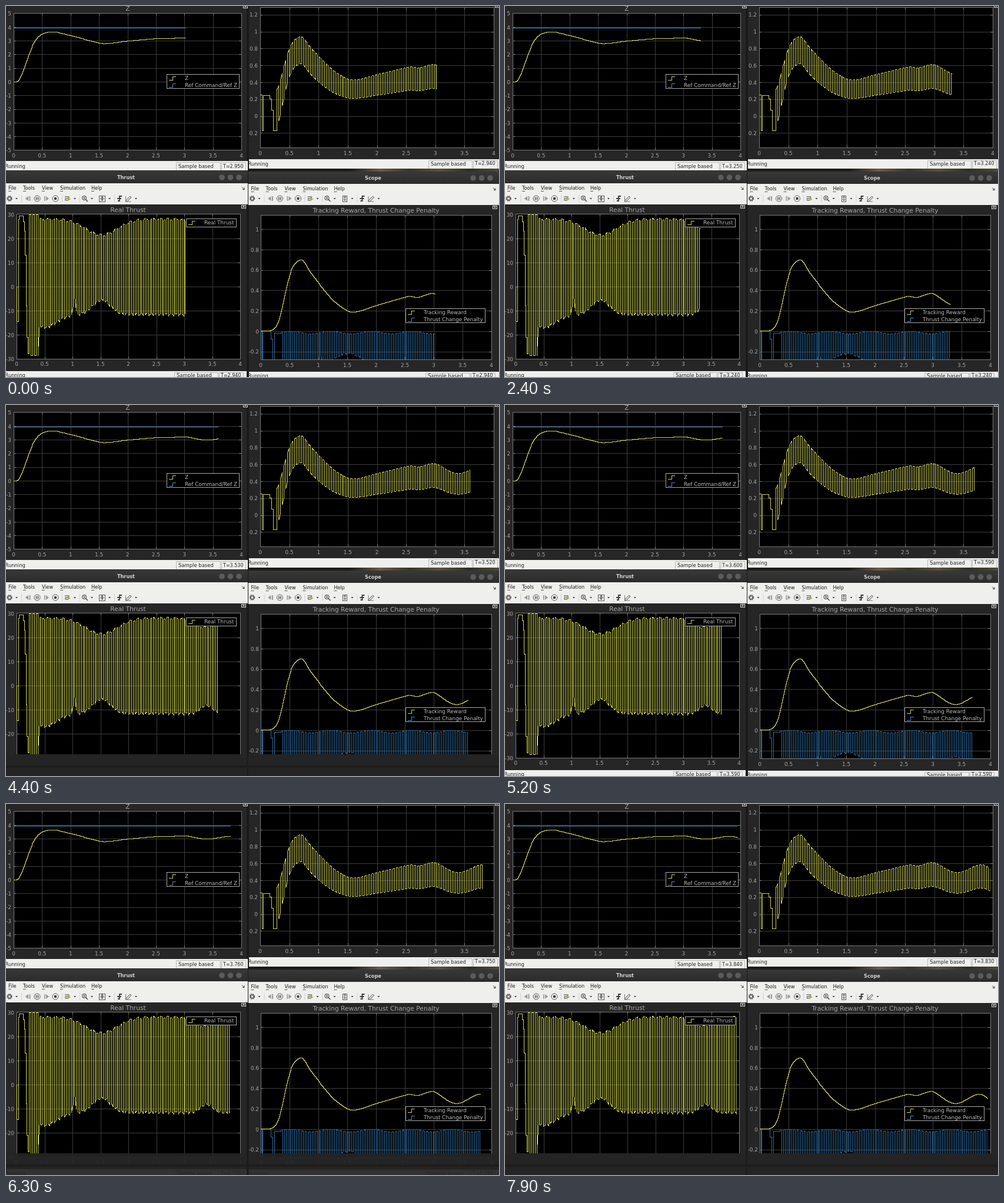
Write an HTML page that moves like this. It is 838 px wide and 632 px high and loops after 8000 ms.

```html
<!DOCTYPE html>
<html lang="en">
<head>
<meta charset="utf-8">
<title>Scopes</title>
<style>
  html, body { margin: 0; width: 100%; height: 100%; overflow: hidden; background: #222; }
  svg { display: block; width: 838px; height: 632px; }
  text { font-family: "DejaVu Sans", sans-serif; white-space: pre; }
  .crisp { shape-rendering: crispEdges; }
</style>
</head>
<body>
<svg id="stage" viewBox="0 0 838 632" xmlns="http://www.w3.org/2000/svg">
  <defs>
    <linearGradient id="bar" x1="0" y1="0" x2="0" y2="1">
      <stop offset="0" stop-color="#383838"/><stop offset="1" stop-color="#2b2b2b"/>
    </linearGradient>
    <linearGradient id="desk">
      <stop offset="0" stop-color="#1d1c18"/><stop offset=".2" stop-color="#6a5c46"/>
      <stop offset=".4" stop-color="#37352a"/><stop offset=".6" stop-color="#5a5040"/>
      <stop offset=".8" stop-color="#2c3024"/><stop offset="1" stop-color="#514839"/>
    </linearGradient>
  </defs>
</svg>
<script>
const stage = document.getElementById('stage');
const defs = stage.querySelector('defs');
const YELLOW = '#cdd052', BLUE = '#3d8fc9', DEEP_BLUE = '#2d6da3', LABEL = '#a6a6a6', INK = '#222';
const crisp = { class: 'crisp' };

function el(name, attrs, parent = stage) {
  const node = document.createElementNS('http://www.w3.org/2000/svg', name);
  for (const key in attrs) node.setAttribute(key, attrs[key]);
  parent.appendChild(node);
  return node;
}
const rect = (x, y, width, height, fill, more = {}, parent) =>
  el('rect', { x, y, width, height, fill, ...more }, parent);
const path = (d, stroke, width = 1, more = {}, parent) =>
  el('path', { d, fill: 'none', stroke, 'stroke-width': width, ...more }, parent);
const shape = (d, fill) => el('path', { d, fill });
const circle = (cx, cy, r, fill, more = {}) => el('circle', { cx, cy, r, fill, ...more });
const frameBox = (x, y, w, h, fill, stroke) =>
  rect(x + .5, y + .5, w, h, fill, { stroke, ...crisp });

// Text whose capitals are centred on y.
function label(x, y, text, size = 8.9, fill = LABEL, anchor = 'start', more = {}) {
  const node = el('text', { x, y: y + size * 0.365, 'font-size': size, fill, 'text-anchor': anchor, ...more });
  node.textContent = text;
  return node;
}

// ---- signals -----------------------------------------------------------
const bump = (t, centre, width) => Math.exp(-(((t - centre) / width) ** 2));

// Interpolation through [x, y] keys: straight, or smooth with Hermite tangents.
function through(keys, x, smooth = false) {
  let i = 0;
  while (i < keys.length - 2 && x > keys[i + 1][0]) i++;
  const [x0, y0] = keys[i], [x1, y1] = keys[i + 1], h = x1 - x0;
  const k = Math.min(1, Math.max(0, (x - x0) / h));
  if (!smooth) return y0 + k * (y1 - y0);
  const slope = j => {
    const a = keys[j - 1], b = keys[j + 1];
    return a && b ? (b[1] - a[1]) / (b[0] - a[0]) : 0;
  };
  return (1 + 2 * k) * (1 - k) ** 2 * y0 + k * (1 - k) ** 2 * h * slope(i) +
    k * k * (3 - 2 * k) * y1 + k * k * (k - 1) * h * slope(i + 1);
}

const REF = 3.95;
const swings = [[.7, 3.65], [.85, 3.52], [1.08, 3.29], [1.33, 3], [1.58, 2.79], [2, 2.97],
  [2.55, 3.16], [2.72, 3.145], [3, 3.21], [3.38, 2.97], [3.81, 3.17], [4.1, 2.97]];
const height = t => t < .7
  ? 3.66 * (1 - Math.exp(-((Math.max(0, t - .05) / .245) ** 1.83)))
  : through(swings, t, true);
const reward = t => Math.exp(-1.415 * (REF - height(t)) ** 1.143);

const signalHi = t => reward(t) + .24;
const signalLo = t => {
  const r = reward(t);
  return .12 + .38 * r + .48 * r * r - .29 * bump(t, .25, .15);
};
const thrustHi = t => t < .39 ? 30
  : 28 - 6.6 * bump(t, 1.52, .4) - 3.8 * bump(t, 3.36, .25) + .5 * Math.sin(t * 47);
const thrustLo = t => t < .39 ? -28.7
  : -11.6 - 5.3 * bump(t, .5, .3) + 6 * bump(t, 1.52, .22) + 3.5 * bump(t, 3.4, .15) +
    8 * bump(t, 1.035, .025) + .6 * Math.sin(t * 71);
const penaltyHi = t => -.015 - .012 * Math.sin(t * 9);
const penaltyLo = t => -.0081 * (thrustHi(t) - thrustLo(t));

// ---- plots -------------------------------------------------------------
const clips = [];

function makePlot({ x0, x1, top, bottom, y0, unit, from, to, step, labelX, labelY }) {
  const X = t => x0 + (x1 - x0) * t / 4;
  const Y = v => y0 - unit * v;
  rect(x0, top, x1 - x0, bottom - top, '#000');
  let grid = '', ticks = '';
  for (let t = 0; t <= 4; t += .5) {
    const x = Math.round(X(t)) + .5;
    if (t > 0 && t < 4) {
      grid += `M${x} ${top}V${bottom}`;
      ticks += `M${x} ${top}v4M${x} ${bottom}v-4`;
    }
    label(X(t), labelY, String(t), 8.9, LABEL, 'middle');
  }
  for (let i = 0; i <= Math.round((to - from) / step); i++) {
    const v = +(from + i * step).toFixed(1), y = Math.round(Y(v)) + .5;
    if (y > top + 2 && y < bottom - 2) {
      grid += `M${x0} ${y}H${x1}`;
      ticks += `M${x0} ${y}h4M${x1} ${y}h-4`;
    }
    label(labelX, Y(v) + .5, String(v), 8.9, LABEL, 'end');
  }
  path(grid, '#3c3c3c', 1, crisp);
  path(ticks, '#808080', 1, crisp);
  frameBox(x0, top, x1 - x0, bottom - top, 'none', '#787878');

  const id = 'clip' + clips.length;
  const clip = el('clipPath', { id }, defs);
  clips.push({ node: rect(x0 - 1, top, 0, bottom - top, '#fff', {}, clip), X, x0 });
  const group = el('g', { 'clip-path': `url(#${id})`, ...crisp });
  return { X, Y, group };
}

// Sampled curve drawn as a fine staircase.
function stairs({ X, Y, group }, value, color) {
  let d = `M${X(0)} ${Y(value(0))}`;
  for (let t = .01; t <= 4; t += .01) d += `H${X(t).toFixed(1)}V${Y(value(t)).toFixed(1)}`;
  path(d, color, 1, {}, group);
}

// Opening steps [time, value], then a square wave between two envelopes.
function pulses({ X, Y, group }, opening, start, hi, lo, color) {
  const PERIOD = .06;
  let d = `M${X(0)} ${Y(opening[0][1])}`;
  const jump = (t, v) => d += `H${X(t).toFixed(1)}V${Y(v).toFixed(1)}`;
  const slide = (t, v) => d += `L${X(t).toFixed(1)} ${Y(v).toFixed(1)}`;
  for (const [t, v] of opening) jump(t, v);
  for (let t = start; t < 4; t += PERIOD) {
    const mid = t + PERIOD / 2, end = t + PERIOD;
    jump(t, hi(t));
    slide(mid, hi(mid));
    jump(mid, lo(mid));
    slide(end, lo(end));
  }
  path(d, color, 1, {}, group);
}

function legend(x, y, w, h, items) {
  frameBox(x, y, w, h, '#000', '#a8a8a8');
  items.forEach(([text, color], i) => {
    const cy = y + 7 + i * 12;
    path(`M${x + 4} ${cy + 3.5}h6v-6h6`, color, 1, crisp);
    label(x + 31, cy, text, 8.9, '#bcbcbc');
  });
}

// ---- window furniture --------------------------------------------------
function statusBar(x, y, w, h, textY, sampleX, timeX) {
  rect(x, y, w, h, '#efefed');
  label(x - 1.5, textY, 'Running', 8.4, INK);
  path(`M${sampleX - 3.5} ${y + h}V${y + 2.5}H${timeX - 4.5}V${y + h}M${timeX - 2.5} ${y + h}V${y + 2.5}h41V${y + h}`, '#b8b8b6');
  label(sampleX, textY, 'Sample based', 8.45, INK);
  return label(timeX, textY, '', 8, INK);
}

function dockIcon(x, y) {
  frameBox(x - 4, y - 3, 7, 5, '#222', '#d8d8d8');
  path(`M${x - 2} ${y}h4M${x} ${y - 2}v3`, '#d8d8d8');
}

function toolbar(x, y, fitW) {
  const grey = '#777', mid = '#555', dark = '#3a3a3a', pale = '#f4f4f4';
  circle(x + 6, y, 3.5, 'none', { stroke: mid, 'stroke-width': 2.4, 'stroke-dasharray': '2 .75' });
  circle(x + 6, y, 2.4, 'none', { stroke: mid });
  for (const c of [18, 117, 146, 176, 221]) shape(`M${x + c - 2} ${y - 1}h4l-2 2.5z`, dark);
  for (const c of [26, 95, 125, 184]) path(`M${x + c + .5} ${y - 6}v12`, '#d0d0d0');
  shape(`M${x + 38} ${y - 4}v8l-5.5-4zM${x + 39.5} ${y - 4}h2v8h-2z`, '#999');
  circle(x + 53, y, 5, pale, { stroke: mid });
  path(`M${x + 51.5} ${y - 2.5}v5m3 0v-5`, dark, 1.4);
  shape(`M${x + 65} ${y - 4}h1.6v8h-1.6zM${x + 68} ${y - 4}v8l5-4z`, '#999');
  circle(x + 84, y, 5, pale, { stroke: mid });
  rect(x + 82, y - 2, 4, 4, dark);
  path(`M${x + 100} ${y - 3}h7v3h-6v3h5`, grey, 1.3);
  shape(`M${x + 105} ${y - 2}l5 3-5 3z`, '#b9a545');
  circle(x + 133, y - 1, 3.4, pale, { stroke: mid, 'stroke-width': 1.2 });
  path(`M${x + 135.5} ${y + 1.5}l3.5 3.5M${x + 131.5} ${y - 1}h3m-1.5-1.5v3`, dark, 1.2);
  frameBox(x + 163 - fitW / 2, y - 5, fitW, 10, pale, mid);
  path(`M${x + 163.5} ${y - 3.5}v7M${x + 161.5} ${y - 1.5}l2-2 2 2m-4 3l2 2 2-2`, dark);
  if (fitW > 8) path(`M${x + 160} ${y}h7`, dark);
  path(`M${x + 190} ${y + 4}h3v-8h4M${x + 189} ${y}h7`, dark, 1.8);
  path(`M${x + 204} ${y + 3}l7-7 2 2-7 7h-3z`, mid, 1, { fill: '#ddd' });
  path(`M${x + 203.5} ${y - 4}v9h9`, grey);
}

function windowHead(x, w, y, left, title, titleX, dotX, fitW) {
  rect(x, y - 11, w, 21, 'url(#bar)');
  label(titleX, y, title, 8.2, '#d2d2d2', 'middle', { 'font-weight': 'bold' });
  for (let i = 0; i < 3; i++) circle(dotX + i * 14.5, y, 4.8, '#5b5b5b');
  rect(x, y + 10, w, 36, '#efefee');
  const menu = { File: 4, Tools: 29, View: 61, Simulation: 92, Help: 145 };
  for (const text in menu) {
    const mx = left + menu[text];
    label(mx, y + 18.5, text, 8.1, '#1c1c1c');
    path(`M${mx} ${y + 23.5}h5`, '#333', .8);
  }
  path(`M${x + w - 10} ${y + 16.5}l4 4m0-3v3h-3`, '#333');
  toolbar(left, 328, fitW);
}

// ---- scene -------------------------------------------------------------
rect(0, 0, 838, 632, '#262626');
rect(409, 0, 4, 632, '#1a1a1a');
rect(411, 277, 427, 6, '#1b1b19');
rect(585, 277, 253, 5, 'url(#desk)');

const zPlot = makePlot({ x0: 13, x1: 400, top: 12, bottom: 245, y0: 129, unit: 23.3,
  from: -5, to: 5, step: 1, labelX: 9, labelY: 254.5 });
label(207, 4, 'Z', 10.66, LABEL, 'middle');
stairs(zPlot, () => REF, BLUE);
stairs(zPlot, height, YELLOW);
legend(273, 116, 123, 24, [['Z', YELLOW], ['Ref Command/Ref Z', BLUE]]);
dockIcon(407, 1);
const times = [statusBar(0, 264, 411, 16, 273, 293, 369)];

const signalPlot = makePlot({ x0: 432, x1: 829, top: 2, bottom: 241, y0: 187.5, unit: 144,
  from: -.2, to: 1.2, step: .2, labelX: 428, labelY: 250.5 });
rect(409, 210, 4, 12, '#1a1a1a');
pulses(signalPlot, [[0, .25], [.03, -.17], [.05, .24], [.17, .2], [.2, .07], [.23, -.17]], .29,
  signalHi, signalLo, YELLOW);
dockIcon(835, 0);
times.push(statusBar(413, 261, 425, 16, 268.5, 722, 797));

const thrustPlot = makePlot({ x0: 18, x1: 398, top: 354, bottom: 601, y0: 478, unit: 4.1,
  from: -30, to: 30, step: 10, labelX: 14, labelY: 610 });
label(207.5, 347, 'Real Thrust', 10.66, LABEL, 'middle');
pulses(thrustPlot, [[0, 0], [.01, -14.5], [.035, 28], [.05, 29.5], [.12, 27], [.14, 23], [.155, 13],
  [.17, -8], [.185, -21], [.2, -28]], .23, thrustHi, thrustLo, '#d6dc4c');
legend(306, 362, 85, 14, [['Real Thrust', YELLOW]]);
dockIcon(404, 342);
windowHead(0, 411, 292, 0, 'Thrust', 204, 367, 10);
times.push(statusBar(0, 622, 409, 10, 629, 290, 365));

const rewardPlot = makePlot({ x0: 433, x1: 825, top: 356, bottom: 602, y0: 553.8, unit: 173.5,
  from: -.2, to: 1, step: .2, labelX: 430, labelY: 611.5 });
label(629, 348, 'Tracking Reward, Thrust Change Penalty', 10.66, LABEL, 'middle');
pulses(rewardPlot, [[0, 0], [.02, -.4], [.04, 0], [.18, -.08], [.21, -.4], [.24, -.02]], .35,
  penaltyHi, penaltyLo, DEEP_BLUE);
stairs(rewardPlot, reward, YELLOW);
legend(679, 515, 135, 24, [['Tracking Reward', YELLOW], ['Thrust Change Penalty', BLUE]]);
dockIcon(831, 343);
windowHead(412, 426, 293, 412.5, 'Scope', 624, 794, 7);
times.push(statusBar(413, 623, 425, 9, 629.5, 717, 793));

// dark band at the bottom
const band = el('g', { opacity: 0 });
rect(0, 595, 838, 37, '#232423', {}, band);
rect(0, 614, 838, 4, '#1c1d1c', {}, band);
rect(409, 595, 3, 37, '#1c1d1c', {}, band);

// ---- motion (seconds) --------------------------------------------------
const LOOP = 8000, TICK = 100;
const drawn = [[0, 3.02], [2.4, 3.305], [3.3, 3.455], [4.4, 3.595], [5.8, 3.75], [6.3, 3.81],
  [6.9, 3.865], [7, 3.865], [7.9, 3.95]];
const clock = [[0, 2.94], [2.4, 3.24], [3.3, 3.38], [4.4, 3.52], [5.8, 3.65], [6.3, 3.75],
  [6.9, 3.78], [7, 3.78], [7.9, 3.83]];
const fade = [[2.9, 0], [3.2, 1], [4.8, 1], [5.1, 0], [5.9, 0], [6.3, .93], [6.4, 1]];
let shown = -1;

function draw(now) {
  const tick = Math.floor((now % LOOP) / TICK);
  if (tick === shown) return;
  shown = tick;
  const s = tick * TICK / 1000;
  const end = through(drawn, s);
  for (const { node, X, x0 } of clips) node.setAttribute('width', X(end) - x0 + 1.5);
  const sim = Math.round(through(clock, s) * 100) / 100;
  times.forEach((node, i) => node.textContent = 'T=' + (sim + (i ? 0 : .01)).toFixed(3));
  band.setAttribute('opacity', through(fade, s));
}

const begin = performance.now();
function loop() {
  draw(performance.now() - begin);
  requestAnimationFrame(loop);
}
loop();
</script>
</body>
</html>
```
